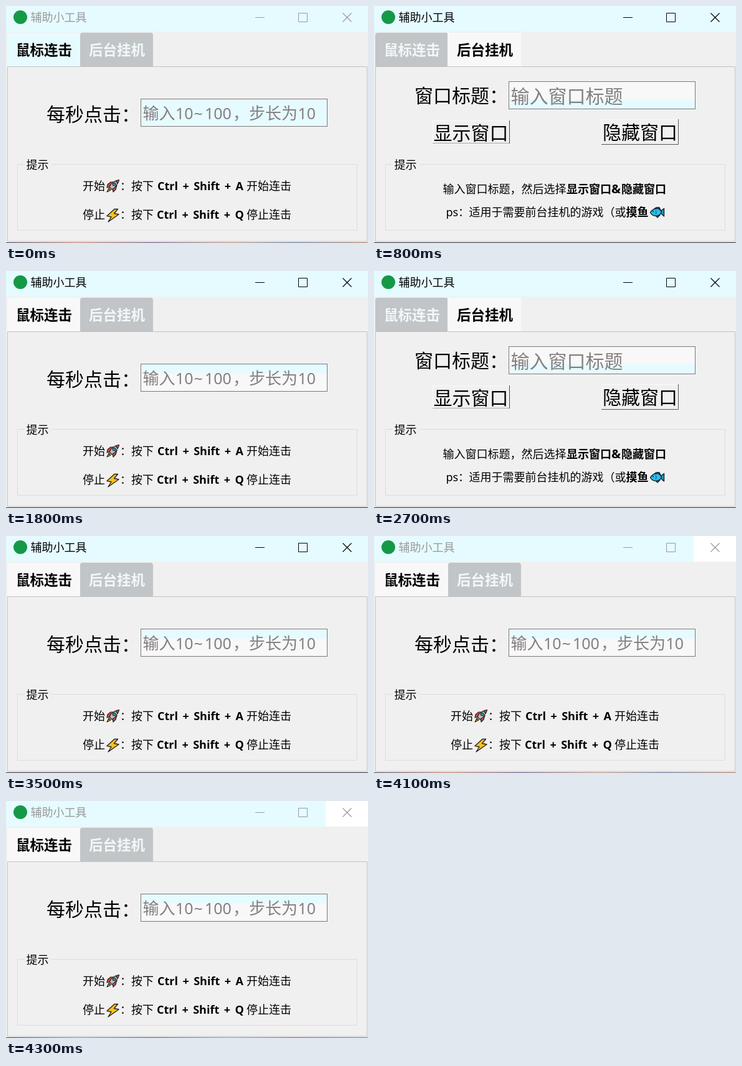
An HTML page that plays this animation: 581 px wide and 381 px high, repeating every 4.4 s.

```html
<!DOCTYPE html>
<html lang="zh-CN">
<head>
<meta charset="utf-8">
<title>辅助小工具</title>
<style>
  html, body { margin: 0; width: 100%; height: 100%; overflow: hidden; background: #f0f0f0; }
  svg { display: block; width: 581px; height: 381px; }
  text { font-family: "Noto Sans CJK SC", "Noto Sans CJK", "Noto Sans", sans-serif; font-size: 18px; white-space: pre; }
  .big { font-size: 30px; }
  .tab { font-size: 22.5px; font-weight: 700; }
  .hint { fill: #857f80; }
  .latin { font-family: "Noto Sans", "Open Sans", sans-serif; }
  .b { font-weight: 700; }
  .keys { font-family: "Noto Sans", "Open Sans", sans-serif; font-weight: 700; word-spacing: 2.8px; }
  .line { fill: none; stroke: currentColor; }

  .chrome, .clicker, .hanger, .fresh, .idle, .leave { animation: 4.4s step-end infinite; }
  .chrome { animation-name: focus; }
  .clicker { animation-name: clicker; }
  .hanger { animation-name: hanger; }
  .fresh { animation-name: fresh; }
  .idle { animation-name: idle; }
  .leave { animation-name: leave; }

  @keyframes focus {
    0%, 93.1818% { color: #999; }
    18.1818% { color: #000; }
  }
  @keyframes clicker {
    0%, 40.9091%, 79.5455% { visibility: visible; }
    18.1818%, 61.3636% { visibility: hidden; }
    100% { visibility: visible; }
  }
  @keyframes hanger {
    0%, 40.9091%, 79.5455% { visibility: hidden; }
    18.1818%, 61.3636% { visibility: visible; }
    100% { visibility: hidden; }
  }
  @keyframes fresh {
    0% { visibility: visible; }
    18.1818%, 100% { visibility: hidden; }
  }
  @keyframes idle {
    0%, 93.1818% { visibility: visible; }
    18.1818% { visibility: hidden; }
    100% { visibility: visible; }
  }
  @keyframes leave {
    0% { visibility: hidden; }
    93.1818%, 100% { visibility: visible; }
  }
</style>
</head>
<body>
<svg viewBox="0 0 581 381">
  <defs>
    <linearGradient id="desk">
      <stop offset="0" stop-color="#3c3558"/>
      <stop offset=".2" stop-color="#c0785a"/>
      <stop offset=".4" stop-color="#5a4a78"/>
      <stop offset=".62" stop-color="#b98a78"/>
      <stop offset=".8" stop-color="#4a6a90"/>
      <stop offset="1" stop-color="#b07060"/>
    </linearGradient>
    <path id="tab" d="M0 97V47q0-4 4-4H113q4 0 4 4V97z"/>
  </defs>

  <rect width="581" height="381" fill="#f0f0f0"/>
  <rect width="581" height="41" fill="#e6fbff"/>
  <rect y="380" width="581" height="1" fill="#29283c"/>
  <rect class="idle" y="380" width="581" height="1" fill="url(#desk)"/>
  <rect class="leave" x="513" width="68" height="41" fill="#fff"/>

  <!-- title bar -->
  <circle cx="23" cy="18" r="11" fill="#159947"/>
  <g class="chrome">
    <text x="39.500" y="25" fill="currentColor">辅助小工具</text>
    <path class="line" d="M400 18.500h15M469.500 11.500h14v14h-14z"/>
    <path class="line" d="M540.500 11.500l14 14m0-14l-14 14" stroke-width="1.200"/>
  </g>

  <!-- pane and tips frame -->
  <path d="M2.500 97.500H579.500V378.500H2.500z" fill="none" stroke="#c2c2c4"/>
  <path d="M30 254.500H18.500V360.500H563.500V254.500H72" fill="none" stroke="#dcdcdc"/>
  <text x="32.500" y="262">提示</text>

  <!-- clicker page -->
  <g class="clicker">
    <use href="#tab" x="2" fill="#f8f8f8"/>
    <use class="fresh" href="#tab" x="2" fill="#e6fbff"/>
    <use href="#tab" x="119" fill="#c1c5c8"/>
    <text class="tab" x="16" y="79">鼠标连击</text>
    <text class="tab" x="133" y="79" fill="#f2f7f8">后台挂机</text>

    <text class="big" x="65" y="184.500">每秒点击：</text>
    <rect x="217" y="150" width="298" height="43" fill="#f8f8f8"/>
    <rect x="217" y="150" width="298" height="15" fill="#e6fbff"/>
    <rect class="fresh" x="217" y="150" width="298" height="43" fill="#e6fbff"/>
    <rect x="216.500" y="149.500" width="299" height="44" fill="none" stroke="#7a7a7a"/>
    <g class="hint">
      <text x="219.500" y="181.500" style="font-size:26px">输入</text>
      <text class="latin" x="272" y="181.500" style="font-size:25px">10</text>
      <text class="latin" x="301.500" y="181.500" style="font-size:25px">~</text>
      <text class="latin" x="319" y="181.500" style="font-size:25px">100</text>
      <text x="364" y="181.500" style="font-size:26px">，步长为</text>
      <text class="latin" x="468.500" y="181.500" style="font-size:25px">10</text>
    </g>

    <text x="123" y="296">开始</text>
    <text x="183" y="296">：</text>
    <text x="201" y="296">按下</text>
    <text class="keys" x="243" y="296">Ctrl + Shift + A</text>
    <text x="386" y="296">开始连击</text>
    <text x="123" y="342">停止</text>
    <text x="183" y="342">：</text>
    <text x="201" y="342">按下</text>
    <text class="keys" x="242" y="342">Ctrl + Shift + Q</text>
    <text x="386" y="342">停止连击</text>

    <!-- rocket -->
    <g stroke="#222" stroke-width="1.200" stroke-linejoin="round">
      <path d="M166 291l-4 1 1-5 5-4 5 0zM171 293l1 6 4-4 2-7z" fill="#e0483c"/>
      <path d="M166 291q3-9 14-11-1 10-10 15z" fill="#b4bcc2"/>
      <path d="M176 281.500q2-1.500 5.500-2-.5 3-2 5.500z" fill="#e0483c"/>
      <circle cx="173.500" cy="286.500" r="2.200" fill="#38b4d8"/>
      <path d="M165 293l-3 6 6-3z" fill="#f5a623"/>
    </g>
    <!-- bolt -->
    <path d="M174 326.500l-12 11 7 1.500-5 8 17-12-7.500-1.500 6-7z" fill="#fcc21b" stroke="#222" stroke-width="1.400" stroke-linejoin="round"/>
  </g>

  <!-- window page -->
  <g class="hanger">
    <use href="#tab" x="2" fill="#c1c5c8"/>
    <rect x="118" y="43" width="118" height="54" fill="#f8f8f8"/>
    <text class="tab" x="16" y="79" fill="#f2f7f8">鼠标连击</text>
    <text class="tab" x="133" y="79">后台挂机</text>

    <text class="big" x="65" y="154.500">窗口标题：</text>
    <rect x="217" y="122" width="298" height="43" fill="#f8f8f8"/>
    <rect x="217" y="150" width="298" height="15" fill="#e6fbff"/>
    <rect x="216.500" y="121.500" width="299" height="44" fill="none" stroke="#7a7a7a"/>
    <text class="big hint" x="219.500" y="155.500">输入窗口标题</text>

    <path d="M94.500 220V184.500H217" fill="none" stroke="#fafafa"/>
    <path d="M94 220.500H217" fill="none" stroke="#a8a8a8"/>
    <path d="M217.500 184V221" fill="none" stroke="#484848"/>
    <text class="big" x="95.500" y="214.500">显示窗口</text>
    <path d="M365.500 222V182.500H488" fill="none" stroke="#fafafa"/>
    <path d="M365 222.500H488.500V182" fill="none" stroke="#585858"/>
    <text class="big" x="367" y="213.500">隐藏窗口</text>

    <text x="110.500" y="301">输入窗口标题，然后选择</text>
    <text class="b" x="309" y="301">显示窗口</text>
    <text class="b latin" x="381" y="301" style="font-size:20px">&amp;</text>
    <text class="b" x="397" y="301">隐藏窗口</text>
    <text class="latin" x="115.500" y="338">ps</text>
    <text x="135" y="338">：</text>
    <text x="152.500" y="338">适用于需要前台挂机的游戏（或</text>
    <text class="b" x="404.500" y="338">摸鱼</text>

    <!-- fish -->
    <g stroke="#16242c" stroke-width="1.400" stroke-linejoin="round">
      <path d="M450 326q3-3 8-2l2 4zM451 336l4 4 4-4z" fill="#1478a8"/>
      <path d="M458 331.500l7.500-6v12.500z" fill="#1e9ccc"/>
      <path d="M443.500 332q4-6.500 10.500-6.500 5 0 7.500 6-3.500 6-9 6-6 0-9-5.500z" fill="#2cc0ec"/>
      <circle cx="448" cy="330.500" r="1" fill="#16242c" stroke="none"/>
      <path d="M452 328q2 3.500 0 7" fill="none" stroke="#1478a8"/>
    </g>
  </g>
</svg>
</body>
</html>
```
